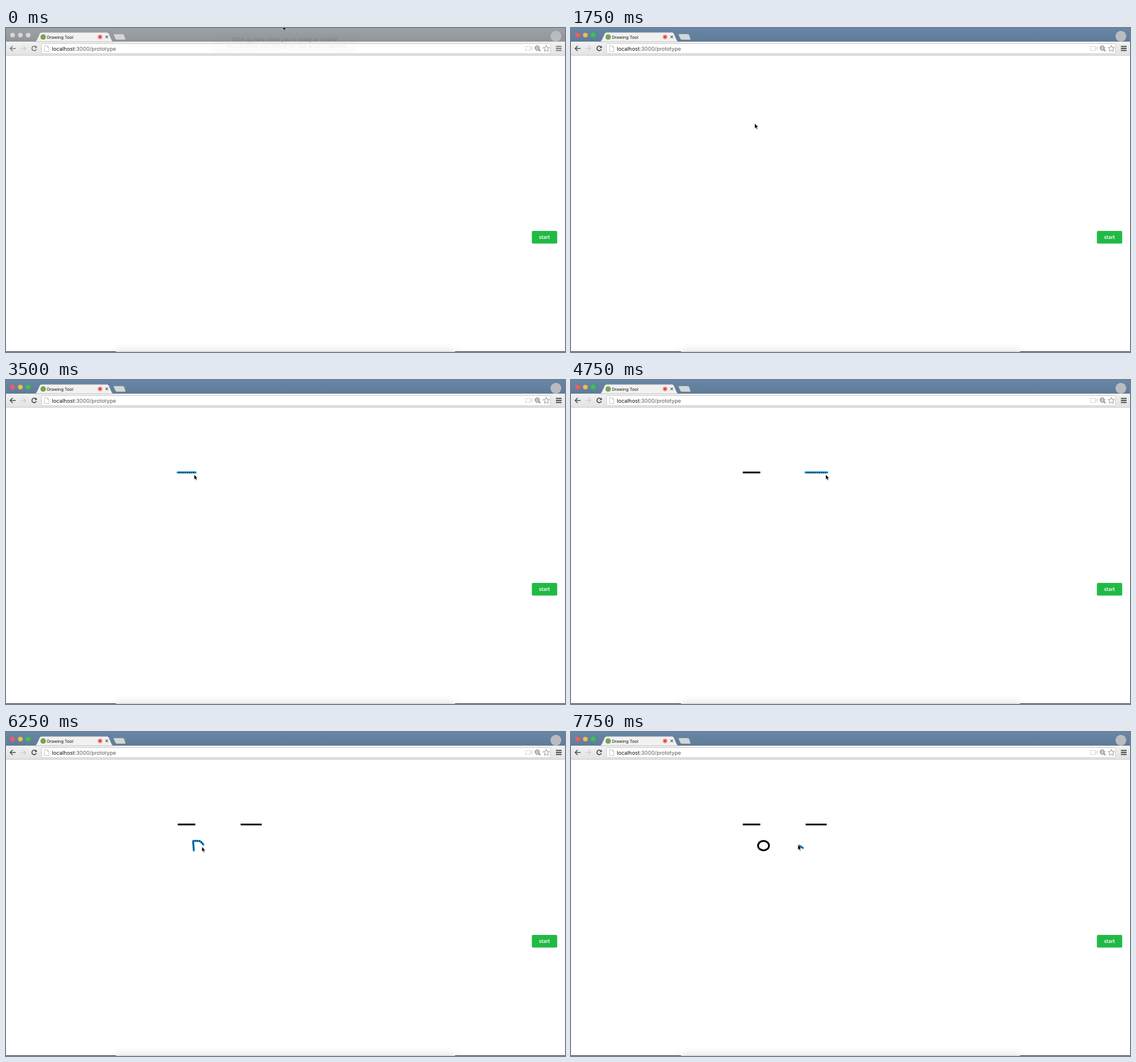
Write an HTML page that moves like this. It is 982 px wide and 570 px high and loops after 8 s.

```html
<!DOCTYPE html>
<html lang="en">
<head>
<meta charset="utf-8">
<title>Drawing Tool</title>
<style>
  html, body { margin: 0; width: 100%; height: 100%; overflow: hidden; background: #fff; }
  svg { display: block; width: 982px; height: 570px; }
  text { font-family: Inter, sans-serif; text-rendering: geometricPrecision; }
  .hint { font-family: "Liberation Sans", Arial, sans-serif; font-size: 9.2px; text-anchor: middle; }
  .button { font: bold 9.2px Lato, sans-serif; text-anchor: middle; fill: #fff; }
  .line { fill: none; stroke-linejoin: round; }
  #done { fill: none; stroke: #000; stroke-width: 3.1; }
  #icons { color: #7c7c7c; }
  .active #icons { color: #4d4d4d; }
  .lights circle { fill: #d5d7d9; }
  .active .lights :nth-child(1) { fill: #fc5b57; }
  .active .lights :nth-child(2) { fill: #fdbc40; }
  .active .lights :nth-child(3) { fill: #34c84a; }
  #titlebar { fill: url(#gray); }
  .active #titlebar { fill: url(#blue); }
</style>
</head>
<body>
<svg id="stage" viewBox="0 0 982 570">
  <defs>
    <linearGradient id="gray" x2="0" y2="1">
      <stop stop-color="#9ea2a7"/><stop offset="1" stop-color="#919498"/>
    </linearGradient>
    <linearGradient id="blue" x2="0" y2="1">
      <stop stop-color="#6886a6"/><stop offset="1" stop-color="#5f7b99"/>
    </linearGradient>
    <linearGradient id="bar" x2="0" y2="1">
      <stop stop-color="#f1f1f1"/><stop offset="1" stop-color="#e3e3e3"/>
    </linearGradient>
    <filter id="soft" x="-10%" width="120%" y="-200%" height="500%">
      <feGaussianBlur stdDeviation="8"/>
    </filter>
  </defs>

  <!-- Window frame -->
  <rect id="titlebar" width="982" height="24"/>
  <rect y="24" width="982" height="24" fill="url(#bar)"/>
  <path d="M0 48.2H982" stroke="#bdbdbd" stroke-width=".8"/>
  <g class="lights">
    <circle cx="11.5" cy="12.5" r="4.1"/><circle cx="25.2" cy="12.5" r="4.1"/><circle cx="38.9" cy="12.5" r="4.1"/>
  </g>
  <path d="M50.5 24.2Q53 23.5 54.3 20.5L58.8 10.5Q60 7.8 62.5 7.8H177.5Q180 7.8 181 10.5L185.3 20.5Q186.6 23.5 189 24.2Z"
        fill="#f1f1f1" stroke="#777d85" stroke-opacity=".6" stroke-width=".7"/>
  <path d="M190 10.5H205Q206.8 10.5 207.5 12L210 19Q210.5 20.8 209 20.8H195Q193 20.8 192 19L189 12Q188.5 10.5 190 10.5Z"
        fill="#d4d5d7" stroke="#777d85" stroke-opacity=".6" stroke-width=".6"/>
  <circle cx="65.3" cy="15.8" r="4.8" fill="#79a353"/>
  <text x="72" y="18.6" font-size="7.4" fill="#111">Drawing Tool</text>
  <circle cx="165.2" cy="15.7" r="3.8" fill="none" stroke="#ef6b67" stroke-width=".8"/>
  <circle cx="165.2" cy="15.7" r="2.7" fill="#ea4340"/>
  <path d="M174.8 13.5l4.4 4.4m0-4.4l-4.4 4.4" stroke="#5c5c5c" stroke-width="1.1"/>
  <circle cx="966" cy="14.5" r="9.5" fill="#b9bcbf"/>

  <!-- Toolbar -->
  <rect x="62.5" y="27.5" width="894" height="17.5" rx="1.8" fill="#fff" stroke="#c2c2c2" stroke-width=".8"/>
  <g id="icons" class="line" stroke="currentColor" stroke-width="1.7">
    <path d="M17 36H7.5M11.7 31.5L7.2 36l4.5 4.5"/>
    <path d="M25 36h9.5M30.3 31.5l4.5 4.5l-4.5 4.5" stroke="#d0d0d0"/>
    <path d="M52.6 33.3A4 4 0 1 0 53.3 37.3"/>
    <path d="M54.2 31v4.3h-4.3z" fill="currentColor" stroke="none"/>
    <path d="M966 32.5h10M966 36h10M966 39.5h10" stroke-width="1.9"/>
    <g stroke-width="1.2" stroke="#666">
      <circle cx="933.2" cy="35.2" r="3.6"/>
      <path d="M931.3 35.2h3.8M936 38l2.8 2.8" stroke-width="1.4"/>
    </g>
    <path id="star" stroke="#8a8a8a" stroke-width=".9"/>
    <path d="M913 32.5h8.5v7H913zM921.5 36l3.5-3v6z" stroke="#cfcfcf" stroke-width=".9"/>
    <path d="M67.5 31h5l2.8 2.8v7.7h-7.8zM72.5 31v2.8h2.8" stroke="#b5b5b5" stroke-width=".8"/>
  </g>
  <text x="80.5" y="39.5" font-size="9.4" fill="#111">localhost<tspan fill="#5a5a5a">:3000/prototype</tspan></text>

  <!-- Fading hint -->
  <g id="hint" class="hint">
    <rect x="365" y="8" width="251" height="36" rx="3" fill="#777" opacity=".025"/>
    <text class="hint" x="490" y="22.6" font-weight="bold" fill="#777a7e" opacity=".65">Click up here when you're ready to record!</text>
    <text class="hint" x="492" y="34.5" fill="#999" opacity=".13">You can move and change the size of your selection</text>
  </g>

  <!-- Page -->
  <rect x="923.8" y="357" width="44.5" height="22.2" rx="2" fill="#21ba45"/>
  <text class="button" x="946" y="370.8">start</text>
  <rect x="193" y="568" width="596" height="20" opacity=".13" filter="url(#soft)"/>
  <path d="M193 569.5H789" stroke="#c9c9c9"/>
  <path d="M0 569.5H193M789 569.5H982" stroke="#1c2127"/>

  <g id="done">
    <path d="M301.7 162.7H332.5"/>
    <path d="M412.2 162.7H449.2"/>
    <ellipse cx="338.2" cy="199.9" rx="9.6" ry="8.3"/>
  </g>
  <g id="live" class="line">
    <path stroke="#189fe0" stroke-width="3.8" stroke-linecap="round"/>
    <path stroke="#0b2438" stroke-width="2"/>
    <path stroke="#35aee8" stroke-width="2.6" stroke-dasharray="1.4 2.2"/>
  </g>
  <path id="cursor" d="M0 0V9L2 7.2L3.5 10.4L5 9.8L3.6 6.6H6.2Z" fill="#000" stroke="#fff" stroke-width=".6"/>
</svg>
<script>
  const LOOP = 8000, TICK = 250;
  const $ = id => document.getElementById(id);
  const start = performance.now();
  const lerp = (a, b, p) => a + (b - a) * p;

  // The pointer reaches a stroke, draws it between from and to, and releases it.
  // grip is the pointer's offset from the drawn end.
  const makeStroke = (d, arrive, from, to, release, grip = [-2.5, 3.5]) => {
    const guide = document.createElementNS('http://www.w3.org/2000/svg', 'path');
    guide.setAttribute('d', d);
    const length = guide.getTotalLength();
    const pointAt = p => {
      const { x, y } = guide.getPointAtLength(length * p);
      return [x, y];
    };
    return {
      arrive, from, to, release, pointAt,
      progress: t => Math.min(1, (t - from) / (to - from)),
      pointer: p => pointAt(p).map((v, i) => v + grip[i]),
      upTo: p => {
        const count = Math.ceil(length * p / 2);
        return 'M' + Array.from({ length: count + 1 }, (_, i) => pointAt(p * i / count)).join('L');
      }
    };
  };

  const strokes = [
    makeStroke('M301.5 162.7H333', 2500, 2500, 3250, 3750),
    makeStroke('M412 162.7H450', 4000, 4250, 4750, 5000),
    makeStroke('M330 208.5L328.6 191.6L339 191.6Q344 193 348 200.5Q347 208 338 209Z', 5500, 5500, 6750, 7000),
    makeStroke('M407.5 204L401 200', 7500, 7500, 7750, LOOP, [-2.5, -1.5])
  ];

  const stops = [
    { time: 0, at: [486.5, -5] },
    { time: 1000, at: [296, 165] },
    { time: 1250, at: [322.8, 167.8] },
    { time: 2000, at: [322.8, 167.8] },
    { time: 2250, at: [312, 179] },
    ...strokes.flatMap(s => [
      { time: s.arrive, at: s.pointer(0) },
      { time: s.from, at: s.pointer(0) },
      { time: s.to, at: s.pointer(1) },
      { time: s.release - TICK, at: s.pointer(1) }
    ])
  ];

  function travel(t) {
    const next = stops.findIndex(stop => stop.time > t);
    if (next < 0) return stops.at(-1).at;
    const a = stops[next - 1], b = stops[next];
    const p = (t - a.time) / (b.time - a.time);
    return a.at.map((v, i) => lerp(v, b.at[i], p));
  }

  const starPoints = Array.from({ length: 10 }, (_, i) => {
    const angle = (i / 5 - 0.5) * Math.PI, r = i % 2 ? 2.6 : 6;
    return [949.3 + r * Math.cos(angle), 36.3 + r * Math.sin(angle)];
  });
  $('star').setAttribute('d', `M${starPoints.join('L')}Z`);

  function draw() {
    const elapsed = (performance.now() - start) % LOOP;
    const t = Math.floor(elapsed / TICK) * TICK;
    const stroke = strokes.find(s => t > s.from && t < s.release);
    const drawing = stroke && t <= stroke.to;
    const [x, y] = drawing ? stroke.pointer(stroke.progress(t)) : travel(t);

    $('stage').classList.toggle('active', t >= 1750);
    $('hint').style.opacity = Math.max(0, 1 - t / 400);
    $('cursor').setAttribute('transform', `translate(${x} ${y})`);
    [...$('done').children].forEach((shape, i) => {
      shape.style.visibility = t >= strokes[i].release ? 'visible' : 'hidden';
    });

    const d = stroke ? stroke.upTo(stroke.progress(t)) : '';
    [...$('live').children].forEach(path => path.setAttribute('d', d));
    requestAnimationFrame(draw);
  }
  draw();
</script>
</body>
</html>
```
